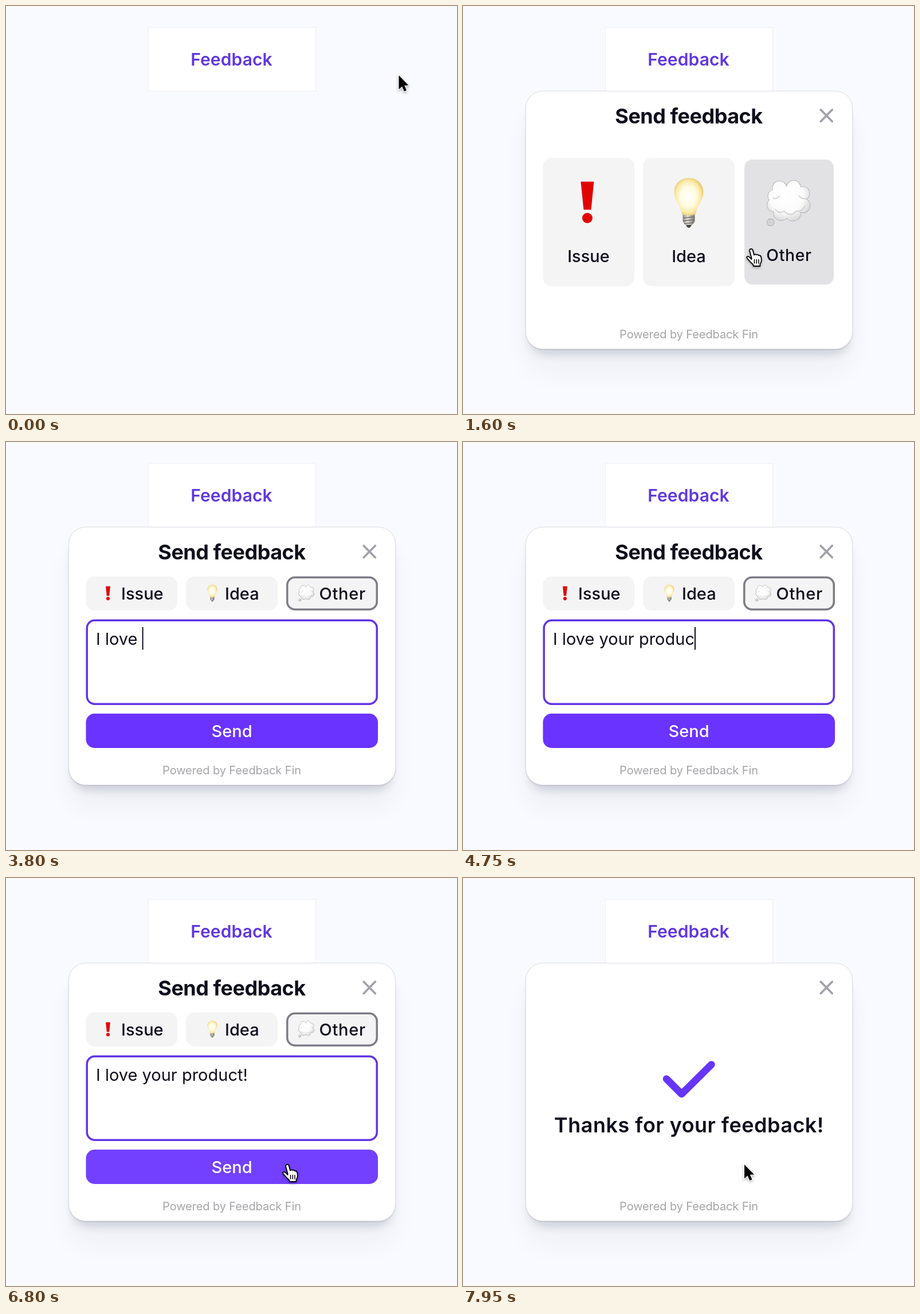
Recreate the animation shown at these times as an HTML page. Size 787x712 px, loop 8 s.

```html
<!DOCTYPE html>
<html lang="en">
<head>
<meta charset="utf-8">
<title>Feedback widget</title>
<style>
  html, body { margin: 0; width: 100%; height: 100%; overflow: hidden; background: #f9faff; }
  svg, .panel { position: absolute; left: 0; top: 0; width: 787px; height: 712px; }
  svg { font: 500 29px Inter, "Open Sans", sans-serif; font-optical-sizing: none; fill: #0f0e1d; }
  .button, .card { position: absolute; box-sizing: border-box; background: #fff; }
  .button { left: 247.5px; top: 37px; width: 293px; height: 112px; border: 1.5px solid #eeedf4; }
  .card {
    left: 109px; top: 148px; width: 571px; height: 451px;
    border: 1px solid #dcdce5; border-radius: 30px;
    box-shadow: 0 40px 50px -6px rgba(20, 30, 50, .055), 0 16px 20px -10px rgba(20, 20, 50, .18),
      0 1px 2px rgba(20, 20, 50, .14);
  }
  .mid { text-anchor: middle; }
  .tile { fill: #f4f4f5; }
  .input { fill: #fff; stroke-width: 3.5; }
  #typed, .hint { font-weight: 400; white-space: pre; }
  .hint { fill: #808087; }

  /* One 8 s clock for everything */
  .panel, .step, .anim { animation: 8s infinite both; }
  .step { animation-timing-function: step-end; }

  .panel { animation-name: open; animation-timing-function: ease-out; }
  @keyframes open { 0%, 6.25% { opacity: 0 } 10%, 100% { opacity: 1 } }

  .choose { animation-name: choose; }
  .form { animation-name: form; }
  .head { animation-name: head; }
  .done { animation-name: done; }
  .send { animation-name: send; }
  .sending { animation-name: sending; }
  @keyframes choose { 0% { opacity: 1 } 23%, 100% { opacity: 0 } }
  @keyframes form { 0% { opacity: 0 } 23% { opacity: 1 } 93.6%, 100% { opacity: 0 } }
  @keyframes head { 0% { opacity: 1 } 93.6%, 100% { opacity: 0 } }
  @keyframes done { 0% { opacity: 0 } 93.6%, 100% { opacity: 1 } }
  @keyframes send { 0% { opacity: 1 } 86.8%, 100% { opacity: 0 } }
  @keyframes sending { 0% { opacity: 0 } 86.8%, 100% { opacity: 1 } }

  .press { transform-box: fill-box; transform-origin: center; }
  .idea { animation-name: idea; }
  .idea .tile { animation-name: ideaFill; }
  .other { animation-name: other; }
  .other .tile { animation-name: otherFill; }
  @keyframes idea { 0%, 16.4% { transform: none } 17.7% { transform: scale(.98) } 19.4%, 100% { transform: none } }
  @keyframes ideaFill { 0%, 16.4% { fill: #f4f4f5 } 17.7% { fill: #e6e6e8 } 19.4%, 100% { fill: #f4f4f5 } }
  @keyframes other { 0%, 18.5% { transform: none } 19.9%, 100% { transform: scale(.975) } }
  @keyframes otherFill { 0%, 18.5% { fill: #f4f4f5 } 19.9%, 100% { fill: #e2e2e4 } }

  .input { animation-name: input; }
  .submit { animation-name: submit; }
  @keyframes input { 0%, 86.75% { stroke: #6234e8 } 87.4%, 100% { stroke: #e0e0e3 } }
  @keyframes submit {
    0%, 78.6% { fill: #6a33ff } 80%, 86.75% { fill: #7340ff } 87.4%, 100% { fill: #ebebee }
  }

  .tick {
    fill: none; stroke: #6635fa; stroke-width: 12.5; stroke-linecap: round; stroke-linejoin: round;
    stroke-dasharray: 1 2; animation-name: tick; animation-timing-function: linear;
  }
  @keyframes tick {
    0%, 95.1% { stroke-dashoffset: 1; opacity: 0 }
    95.2% { stroke-dashoffset: 1; opacity: 1 }
    99.3%, 100% { stroke-dashoffset: 0; opacity: 1 }
  }

  .pointer { animation-name: move; animation-timing-function: ease-in-out; }
  @keyframes move {
    0% { transform: translate(685.5px, 121px) }
    4.375%, 12.5% { transform: translate(352px, 93px) }
    20%, 22.5% { transform: translate(503px, 424px) }
    26.9%, 76.5% { transform: translate(458px, 414.5px) }
    80% { transform: translate(493px, 494px) }
    82.5%, 100% { transform: translate(491px, 500px) }
  }
  .arrow { animation-name: arrow; filter: drop-shadow(0 2px 2px rgba(0, 0, 0, .3)); }
  .hand { animation-name: hand; filter: drop-shadow(0 2px 2px rgba(0, 0, 0, .3)); }
  .beam { animation-name: beam; }
  @keyframes arrow {
    0% { opacity: 1 } 2.1% { opacity: 0 } 14.7% { opacity: 1 } 16.4% { opacity: 0 } 86.8%, 100% { opacity: 1 }
  }
  @keyframes hand {
    0% { opacity: 0 } 2.1% { opacity: 1 } 14.7% { opacity: 0 } 16.4% { opacity: 1 }
    23% { opacity: 0 } 78.6% { opacity: 1 } 86.8%, 100% { opacity: 0 }
  }
  @keyframes beam {
    0% { opacity: 0 } 23% { opacity: 1 } 38.7% { opacity: 0 } 76.8% { opacity: 1 } 78.6%, 100% { opacity: 0 }
  }
</style>
</head>
<body>
<div class="button"></div>
<svg viewBox="0 0 787 712">
  <text class="mid" x="393.5" y="103.5" font-size="30" font-weight="600" letter-spacing=".1" fill="#5f37e0">Feedback</text>
</svg>

<div class="panel">
  <div class="card"></div>
  <svg viewBox="0 0 787 712">
    <defs>
      <radialGradient id="glass" cx=".48" cy=".5" r=".54">
        <stop offset="0" stop-color="#fffffa"/><stop offset=".5" stop-color="#fffbe3"/>
        <stop offset=".8" stop-color="#fbe9a6"/><stop offset="1" stop-color="#e6c76c"/>
      </radialGradient>
      <linearGradient id="metal">
        <stop offset="0" stop-color="#8d8a84"/><stop offset=".4" stop-color="#e6e3dc"/>
        <stop offset="1" stop-color="#77736d"/>
      </linearGradient>
      <radialGradient id="puff" gradientUnits="userSpaceOnUse" cx="-4" cy="-14" r="50">
        <stop offset="0" stop-color="#fff"/><stop offset=".6" stop-color="#fbfbfb"/>
        <stop offset="1" stop-color="#d4d4d4"/>
      </radialGradient>
      <g id="bang" fill="#e00505">
        <path d="M-11.500-36H11.500L6.500 13H-6.500Z"/><circle cy="27.500" r="9"/>
      </g>
      <g id="bulb">
        <path d="M-10.500 19H10.500V33Q8 38 4 40Q0 45-4 40Q-8 38-10.500 33Z" fill="url(#metal)"/>
        <path d="M-10 27L10 25M-10 32L10 30M-8 37L8 35" stroke="#706c66" stroke-width="1.600"/>
        <path d="M-5 39H5Q3 44 0 44Q-3 44-5 39Z" fill="#4a4743"/>
        <path d="M0-43C15-43 25.500-32 25.500-18C25.500-4 14 6 12.500 18Q12 21 9 21.500Q0 23-9 21.500Q-12 21-12.500 18C-14 6-25.500-4-25.500-18C-25.500-32-15-43 0-43Z" fill="url(#glass)"/>
      </g>
      <g id="puffs">
        <circle cx="-16" cy="-27" r="12.500"/><circle cx="9" cy="-28" r="12.500"/>
        <circle cx="26" cy="-18" r="11.500"/><circle cx="26" cy="4" r="12.500"/>
        <circle cx="8" cy="18" r="13.500"/><circle cx="-13" cy="17" r="13.500"/>
        <circle cx="-26" cy="3" r="12"/><circle cx="-25" cy="-13" r="11.500"/>
        <ellipse cy="-5" rx="28" ry="25"/>
        <circle cx="-32" cy="34" r="6"/>
      </g>
      <g id="cloud">
        <use href="#puffs" stroke="#a8a8a8" stroke-width="1.600"/>
        <use href="#puffs" fill="url(#puff)"/>
        <path d="M-24 10Q-18 20-8 14Q2 26 14 14Q24 16 30 4M18-14Q25-6 33-9M-28-10Q-20-6-16-14" fill="none" stroke="#d2d2d2" stroke-width="2"/>
      </g>
    </defs>

    <path d="M624.250 181L644.250 201.500M644.250 181L624.250 201.500" stroke="#a1a1aa" stroke-width="3.800" stroke-linecap="round"/>
    <text class="mid" x="394" y="580" font-size="20" font-weight="400" letter-spacing="-.1" fill="#a5a5a9">Powered by Feedback Fin</text>
    <text class="head step mid" x="394" y="205" font-size="36" font-weight="650" letter-spacing="-.5">Send feedback</text>

    <g class="choose step mid">
      <g>
        <rect class="tile" x="139.500" y="265" width="159.500" height="224" rx="15"/>
        <use href="#bang" x="217" y="342.500"/>
        <text x="219" y="447">Issue</text>
      </g>
      <g class="idea anim press">
        <rect class="tile anim" x="314" y="265" width="160" height="224" rx="15"/>
        <use href="#bulb" x="394" y="343"/>
        <text x="394" y="447">Idea</text>
      </g>
      <g class="other anim press">
        <rect class="tile anim" x="489" y="265" width="160" height="224" rx="15"/>
        <use href="#cloud" x="568" y="343.500"/>
        <text x="569" y="447" letter-spacing=".7">Other</text>
      </g>
    </g>

    <g class="form step">
      <rect class="tile" x="139.500" y="234.500" width="159.500" height="59.500" rx="15"/>
      <rect class="tile" x="314" y="234.500" width="160" height="59.500" rx="15"/>
      <rect class="tile" x="490.750" y="236.250" width="156.500" height="56" rx="13.500" stroke="#7d7d87" stroke-width="3.500"/>
      <use href="#bang" transform="translate(178 264) scale(.34)"/>
      <use href="#bulb" transform="translate(360 263.500) scale(.34)"/>
      <use href="#cloud" transform="translate(524 264) scale(.35)"/>
      <text x="201" y="275">Issue</text>
      <text x="382" y="275">Idea</text>
      <text x="546.500" y="275" letter-spacing=".7">Other</text>
      <rect class="input anim" x="141.250" y="311.250" width="506" height="146" rx="13.500"/>
      <text class="hint" id="hint" x="157" y="353.500">I think...</text>
      <text id="typed" x="157" y="353.500"></text>
      <rect id="caret" y="323" width="2" height="39.500"/>
      <rect class="submit anim" x="139.500" y="474" width="509.500" height="60" rx="15"/>
      <text class="send step mid" x="394" y="514.500" fill="#fff">Send</text>
      <text class="sending step mid" x="394" y="514.500" fill="#9d9da6" letter-spacing="-.3">Sending...</text>
    </g>

    <g class="done step">
      <path class="tick anim" pathLength="1" d="M355 350.500L381.500 377L433.500 325.500"/>
      <text class="mid" x="394.500" y="444" font-size="36" font-weight="600" letter-spacing=".48">Thanks for your feedback!</text>
    </g>
  </svg>
</div>

<svg viewBox="0 0 787 712">
  <g class="pointer anim">
    <path class="arrow step" d="M0 0V24.500L5.600 19.400L9.400 28L13.500 26.300L9.800 17.800L17 17.500Z" fill="#000" stroke="#fff" stroke-width="2.400" paint-order="stroke"/>
    <g class="hand step" stroke="#000" stroke-width="1.800" stroke-linejoin="round" stroke-linecap="round">
      <path transform="translate(-9 -1)" fill="#fff" d="M9.500 17L6.300 5Q5.500 1.500 8.500 1Q11 .6 12 4L14 11.500Q15.500 9.500 18 11Q20 10 21.800 12.200Q25.500 11.500 26.300 15.500L26.800 20Q27 24 24.500 27L24.300 31H13L12 28Q7 23.500 2 17.500Q0 14.500 3 13.800Q5 13.600 9.500 19Z"/>
      <path transform="translate(-9 -1)" fill="none" stroke-width="1.500" d="M14.500 19.500V26M18.300 19.500V26M22 19.500V26"/>
    </g>
    <path class="beam step" d="M-6-14Q-1-14 0-11Q1-14 6-14M0-11V11M-6 14Q-1 14 0 11Q1 14 6 14M-3 1H3" fill="none" stroke="#111" stroke-width="2" stroke-linecap="round"/>
  </g>
</svg>

<script>
  const LOOP = 8000, START = 157;
  const message = "I love your product!";
  // When each character is typed, in ms
  const keys = [3100, 3350, 3500, 3550, 3600, 3650, 3800, 3900, 4000, 4100,
                4200, 4300, 4350, 4400, 4500, 4600, 4650, 4750, 4900, 5600];
  const caretOn = [[1850, 2600], [3100, 5100], [5600, 5900]];

  const [typed, hint, caret] = ["typed", "hint", "caret"].map(id => document.getElementById(id));
  const show = (el, on) => el.setAttribute("opacity", on ? 1 : 0);
  let origin;

  function draw(now) {
    origin ??= now;
    const t = (now - origin) % LOOP + 8;
    const text = message.slice(0, keys.filter(k => k <= t).length);
    if (typed.textContent !== text) typed.textContent = text;
    show(hint, !text);
    show(caret, caretOn.some(([from, to]) => t >= from && t < to));
    caret.setAttribute("x", START + (text ? typed.getComputedTextLength() : 1));
    requestAnimationFrame(draw);
  }
  requestAnimationFrame(draw);
</script>
</body>
</html>
```
